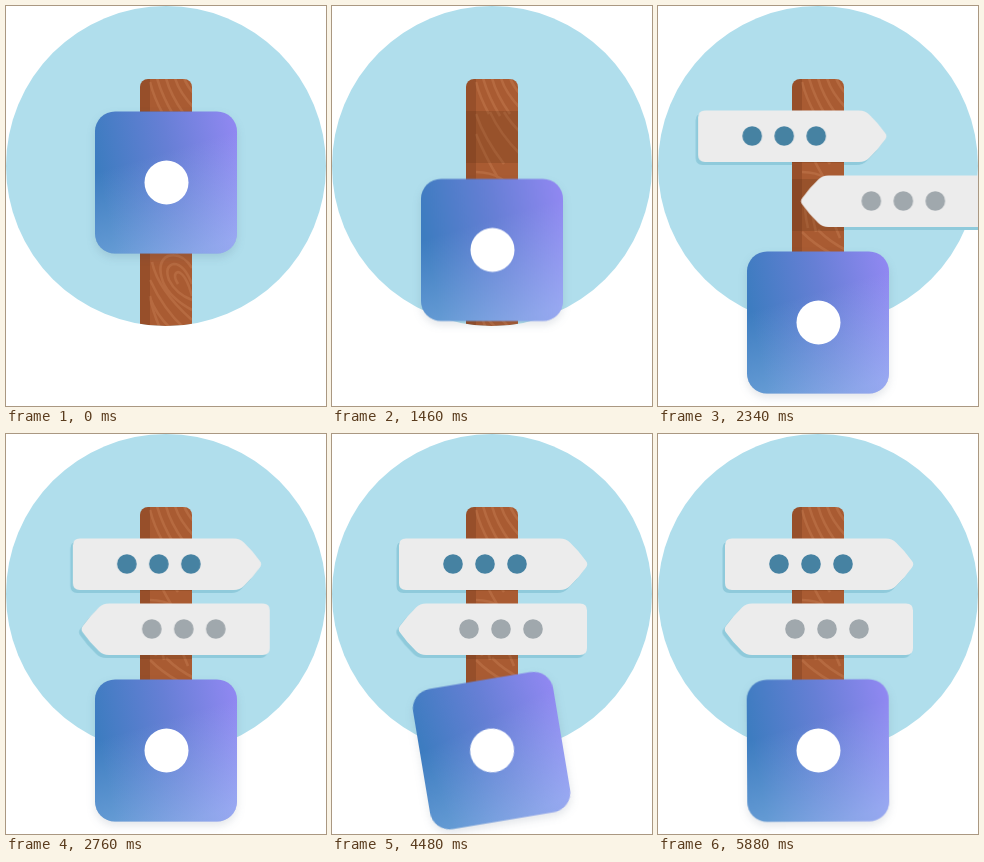
Recreate the animation shown at these times as an HTML page. Size 320 by 400 pixels, loop 6.94 s.

```html
<!DOCTYPE html>
<html lang="en">
<head>
<meta charset="utf-8">
<title>Signpost</title>
<style>
  html, body { margin: 0; width: 100%; height: 100%; overflow: hidden; background: #fff; }
  svg { display: block; width: 100%; height: 100%; }

  .upper, .lower, .drop, .swing { animation: 6940ms ease infinite; }
  .upper { animation-name: upper; }
  .lower { animation-name: lower; }
  .drop { animation-name: drop; }
  .swing { animation-name: swing; transform-origin: 160px 179px; }

  /* tile falls 1120-2320 ms, signs slide in from 1600 and 1840 ms, swing runs 3040-6040 ms */
  @keyframes drop {
    0%, 16.138% { transform: translateY(0); }
    33.429%, 100% { transform: translateY(140px); }
  }
  @keyframes upper {
    0%, 23.055% { transform: translateX(-260px); }
    40.346%, 100% { transform: translateX(0); }
  }
  @keyframes lower {
    0%, 26.513% { transform: translateX(260px); }
    43.804%, 100% { transform: translateX(0); }
  }
  @keyframes swing {
    0%, 43.804% { transform: rotate(0deg); }
    58.213% { transform: rotate(20deg); }
    72.622% { transform: rotate(-20deg); }
    87.032%, 100% { transform: rotate(0deg); }
  }

  .board { fill: #ececec; }
  .edge { fill: #8fcadb; }
  .grain { fill: none; stroke: #b66a40; stroke-width: 2.6; }
  .tile { filter: drop-shadow(0 4px 4px rgba(40, 60, 90, .13)); }
</style>
</head>
<body>
<svg viewBox="0 0 320 400">
  <defs>
    <clipPath id="disc"><circle cx="160" cy="160" r="160"/></clipPath>
    <clipPath id="post"><rect x="134" y="73" width="52" height="270" rx="8"/></clipPath>
    <linearGradient id="hue" x1="0" y1=".3" x2="1" y2=".1">
      <stop offset="0" stop-color="#3d7cc0"/>
      <stop offset=".5" stop-color="#667fd5"/>
      <stop offset="1" stop-color="#9188f2"/>
    </linearGradient>
    <linearGradient id="glow" x1=".35" y1="0" x2=".65" y2="1">
      <stop offset=".3" stop-color="#b8dcff" stop-opacity="0"/>
      <stop offset="1" stop-color="#b8dcff" stop-opacity=".4"/>
    </linearGradient>
    <path id="sign" d="M74 104.5H228Q234 104.5 238 108.5Q247 117 254 127Q256.5 130 254 133.5Q247 143.500 238 152Q234 156 228 156H74Q67 156 67 149V111.500Q67 104.500 74 104.500Z"/>
    <g id="dots">
      <circle cx="121" cy="130" r="9.8"/>
      <circle cx="153" cy="130" r="9.8"/>
      <circle cx="185" cy="130" r="9.8"/>
    </g>
  </defs>

  <circle cx="160" cy="160" r="160" fill="#b0deec"/>

  <g class="edge">
    <g class="upper"><use href="#sign" x="-2.500" y="3"/></g>
    <g class="lower"><use href="#sign" transform="translate(319.500 68) scale(-1 1)"/></g>
  </g>

  <g clip-path="url(#disc)">
    <g clip-path="url(#post)">
      <rect x="134" y="73" width="52" height="250" fill="#a95b32"/>
      <g class="grain">
        <path d="M144 76Q148 92 157 108M151 72Q156 90 168 110M160 72Q164 88 178 108M169 72Q173 86 188 102M178 72Q181 80 188 88"/>
        <path d="M144 108Q152 132 172 158M144 128Q152 148 166 172M158 106Q168 128 188 148M172 106Q178 116 188 126"/>
        <path d="M150 222Q142 188 156 180Q168 178 188 214M158 226Q150 194 158 190Q166 192 182 232M144 166Q172 166 188 192"/>
        <path d="M144 226Q156 238 172 247M160 224Q172 236 188 244"/>
        <path d="M146 256Q152 284 186 314M154 322Q146 304 144 290M186 262Q176 246 162 250Q150 256 157 276Q164 292 186 304"/>
        <path d="M186 278Q178 258 168 258Q158 260 163 274Q170 288 186 294M186 290Q180 268 172 266Q166 268 172 278M144 274Q158 304 178 322M144 292Q150 308 164 322"/>
      </g>
      <rect x="134" y="73" width="10" height="250" fill="#5c2a12" opacity=".24"/>
      <path d="M134 105h52v52h-52zM134 173h52v52h-52z" fill="#55300f" opacity=".2"/>
    </g>
  </g>

  <g class="upper">
    <use href="#sign" class="board"/>
    <use href="#dots" fill="#4682a2"/>
  </g>
  <g class="lower">
    <use href="#sign" class="board" transform="translate(322 65) scale(-1 1)"/>
    <use href="#dots" x="16" y="65" fill="#a0a8ad"/>
  </g>

  <g class="drop">
    <g class="swing">
      <g class="tile">
        <rect x="89" y="105.500" width="142" height="142" rx="20" fill="url(#hue)"/>
        <rect x="89" y="105.500" width="142" height="142" rx="20" fill="url(#glow)"/>
        <circle cx="160.500" cy="176.500" r="22" fill="#fff"/>
      </g>
    </g>
  </g>
</svg>
</body>
</html>
```
